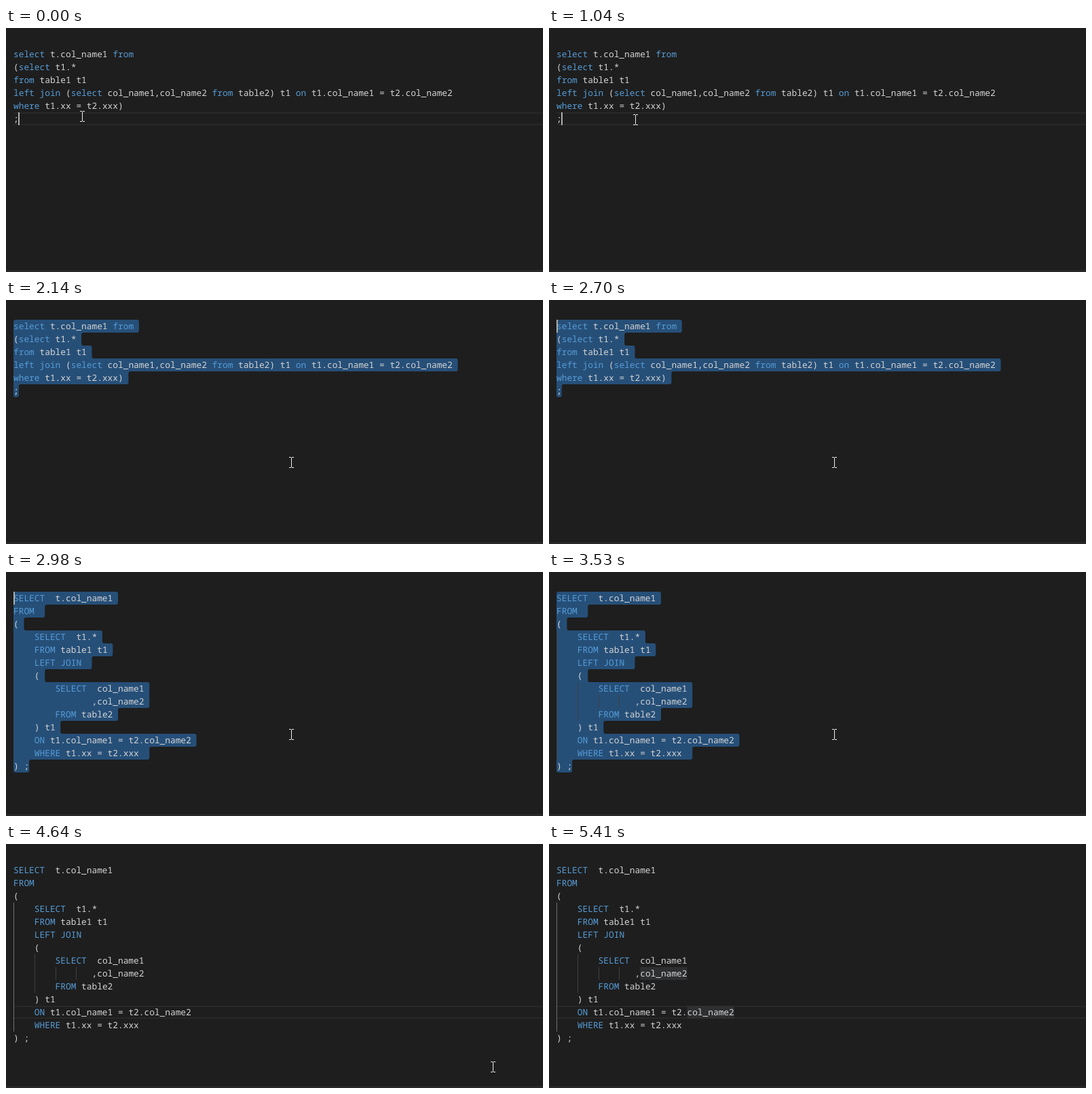
An HTML page that plays this animation: 791 by 359 pixels, repeating every 5510 ms.

```html
<!DOCTYPE html>
<html lang="en">
<head>
<meta charset="utf-8">
<title>SQL formatter</title>
<style>
  html, body { margin: 0; width: 100%; height: 100%; overflow: hidden; background: #1e1e1e; }
  svg { display: block; width: 791px; height: 359px; }
  text {
    font: 12.83px "Noto Sans Mono", "DejaVu Sans Mono", monospace;
    text-rendering: geometricPrecision;
    fill: #d4d4d4;
  }
  .kw { fill: #569cd6; }
  .sel { fill: #264f78; }
  .row { fill: #282828; }
  .word { fill: #2d2f31; }
  .guide { fill: #404040; }
  .active { fill: #707070; }
  .caret { fill: #aeafad; }
  .mouse { fill: #f0f0f0; }
</style>
</head>
<body>
<script>
const LOOP = 5510, X = 11, Y = 29, CH = 7.7, LH = 19;

const before = [
  "select t.col_name1 from",
  "(select t1.*",
  "from table1 t1",
  "left join (select col_name1,col_name2 from table2) t1 on t1.col_name1 = t2.col_name2",
  "where t1.xx = t2.xxx)",
  ";",
];
const after = [
  "SELECT  t.col_name1",
  "FROM ",
  "(",
  "    SELECT  t1.*",
  "    FROM table1 t1",
  "    LEFT JOIN ",
  "    (",
  "        SELECT  col_name1",
  "               ,col_name2",
  "        FROM table2",
  "    ) t1",
  "    ON t1.col_name1 = t2.col_name2",
  "    WHERE t1.xx = t2.xxx ",
  ") ;",
];

const colX = c => X + c * CH;
const lineY = n => Y + n * LH;
const rect = (cls, x, y, w, h) =>
  `<rect class="${cls}" x="${x}" y="${y}" width="${w}" height="${h}"/>`;

// Hard-switched keyframes: steps are [ms, css declarations]
let rules = "", count = 0;
function track(steps, content) {
  const id = "k" + count++;
  const frames = steps.map(([ms, css]) =>
    `${(Math.max(0, ms - 1) / LOOP * 100).toFixed(4)}%{${css}}`);
  rules += `@keyframes ${id}{${frames.join("")}100%{${steps[steps.length - 1][1]}}}`;
  return `<g style="animation:${id} ${LOOP}ms step-end infinite">${content}</g>`;
}
const HIDE = "visibility:hidden", SHOW = "visibility:visible";
function during(from, to, content) {
  const steps = [[from, SHOW]];
  if (from > 0) steps.unshift([0, HIDE]);
  if (to < LOOP) steps.push([to, HIDE]);
  return track(steps, content);
}
const at = (ms, x, y) => [ms, `${SHOW};transform:translate(${x}px,${y}px)`];
const off = ms => [ms, HIDE];

function code(lines) {
  const token = /(select|from|left|join|on|where)\b|\(|[^\s(]+/gi;
  return lines.map((line, n) => [...line.matchAll(token)].map(m =>
    `<text${m[1] ? ' class="kw"' : ""} x="${colX(m.index).toFixed(2)}" y="${lineY(n) + 14}">${m[0]}</text>`
  ).join("")).join("");
}

// Outline of the selected lines with rounded inner and outer corners
function selection(lines, first) {
  const r = 3, last = lines.length - 1;
  const right = n => colX(lines[n].length + (n < last ? 1 : 0));
  const top = lineY(first), end = lineY(last + 1);
  let a = right(first);
  let d = `M${X} ${top + r}Q${X} ${top} ${X + r} ${top}H${a - r}Q${a} ${top} ${a} ${top + r}`;
  for (let n = first + 1; n <= last; n++) {
    const b = right(n), y = lineY(n), s = Math.sign(b - a) * r;
    if (s) d += `V${y - r}Q${a} ${y} ${a + s} ${y}H${b - s}Q${b} ${y} ${b} ${y + r}`;
    a = b;
  }
  d += `V${end - r}Q${a} ${end} ${a - r} ${end}H${X + r}Q${X} ${end} ${X} ${end - r}Z`;
  return `<path class="sel" d="${d}"/>`;
}

const currentLine = n =>
  rect("row", X, lineY(n), 780, 2) + rect("row", X, lineY(n) + LH - 2, 780, 2);
const guide = (cls, col, from, to) =>
  rect(cls, Math.round(colX(col)), lineY(from), 1, (to - from) * LH);
const word = (col, n) => rect("word", colX(col), lineY(n), 9 * CH, LH);

const innerGuides = guide("guide", 4, 7, 10) + guide("guide", 8, 8, 9) + guide("guide", 12, 8, 9);

const caret = track([
  at(0, 18, 124), off(490), at(1040, 18, 124),
  at(1410, 11, 86), at(1530, 11, 48), at(1680, 11, 29),
  off(2140), at(2700, 11, 29), off(3530),
  at(4090, 272, 238), off(4490), at(5030, 272, 238), off(5410),
], rect("caret", 0, 0, 2, LH));

const mouse = track([
  at(0, 112, 122), at(250, 120, 125), at(370, 127, 127), off(1410),
  at(2140, 420, 231), at(4210, 457, 242), at(4360, 560, 262),
  at(4490, 650, 284), at(4640, 717, 320), off(4760),
], `<path class="mouse" d="M-3 0h3v1h1v-1h3v1h-3v14h3v1h-3v-1h-1v1h-3v-1h3v-14h-3z"/>`);

const scene = [
  rect("row", 0, 356, 791, 3),
  during(0, 1410, currentLine(5)),
  during(1410, 1530, selection(before, 3)),
  during(1530, 1680, selection(before, 1)),
  during(1680, 2980, selection(before, 0)),
  during(2980, 4090, selection(after, 0)),
  during(4090, LOOP, currentLine(11)),
  during(5410, LOOP, word(16, 8) + word(25, 11)),
  during(3100, LOOP, innerGuides),
  during(3100, 4090, guide("guide", 0, 3, 13)),
  during(4090, LOOP, guide("active", 0, 3, 13)),
  during(0, 2980, code(before)),
  during(2980, LOOP, code(after)),
  caret,
  mouse,
].join("");

document.body.innerHTML =
  `<style>${rules}</style><svg viewBox="0 0 791 359" shape-rendering="auto">${scene}</svg>`;
</script>
</body>
</html>
```
